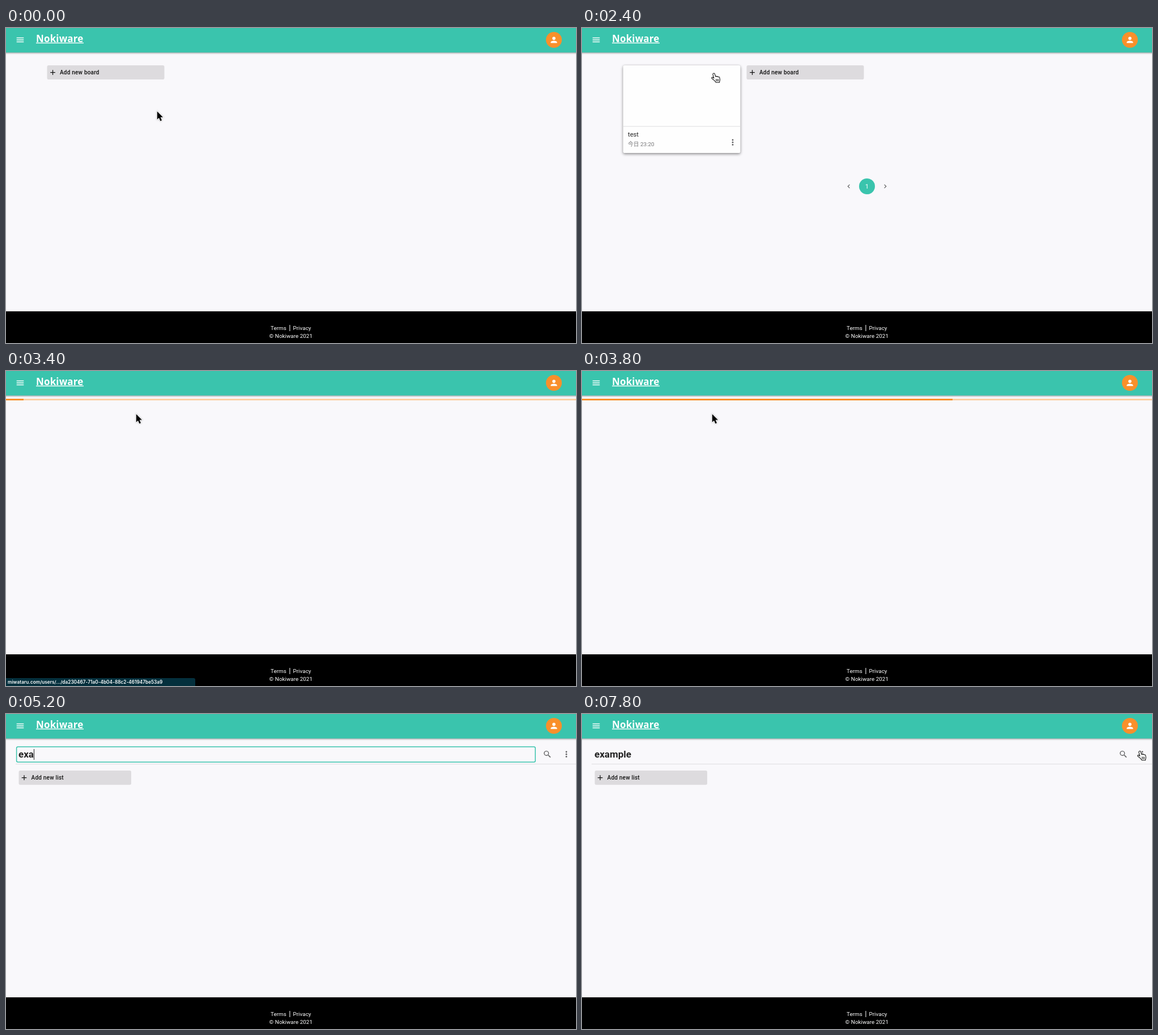
Recreate the animation shown at these times as an HTML page. Size 1006x557 px, loop 8 s.

```html
<!DOCTYPE html>
<html lang="en">
<head>
<meta charset="utf-8">
<title>Board demo</title>
<style>
  html, body { margin: 0; width: 100%; height: 100%; overflow: hidden; background: #f9f8fb; }
  svg { position: absolute; left: 0; top: 0; display: block; }
  text { font-family: Roboto, "Noto Sans CJK JP", "Noto Sans CJK", sans-serif; white-space: pre; fill: #222; }
  .logo { font: 700 17px "Noto Sans", sans-serif; letter-spacing: .15px; fill: #fff; }
  .add { font-size: 10px; font-weight: 500; letter-spacing: .2px; fill: #111; }
  .body { font-size: 11.2px; }
  .hint { font-size: 8.4px; letter-spacing: .27px; fill: #6b6b6d; }
  .date { font-size: 9.8px; fill: #757577; }
  .foot { font-size: 9.8px; letter-spacing: .05px; fill: #fff; }
  .title { font-size: 17px; font-weight: 700; }
  .link { font: 600 8.25px Inter, sans-serif; fill: #fff; }
  .field { fill: none; stroke: #3ac4ad; stroke-width: 1.5; }
  .gray { fill: #dddbde; }
  .rule { fill: #dedde0; }
  .icon { fill: #5f5f61; }
  .dark { fill: #111; }
  .white { fill: #fff; }
  .raised { fill: #fefefe; filter: drop-shadow(0 2px 2.5px rgba(0,0,0,.38)) drop-shadow(0 0 1px rgba(0,0,0,.15)); }
  .caret { fill: #222; }
  #bar { position: absolute; left: 0; top: 48.5px; width: 1006px; height: 3px; overflow: hidden; background: #fbd0a5; }
  #bar i { position: absolute; top: 0; bottom: 0; background: #f9902b; }
</style>
</head>
<body>
<div id="bar"><i></i></div>
<svg width="1006" height="557" viewBox="0 0 1006 557">
  <defs>
    <path id="menu" d="M3 18h18v-2H3zm0-5h18v-2H3zm0-7v2h18V6z"/>
    <path id="person" d="M12 12a4 4 0 1 0 0-8 4 4 0 0 0 0 8zm0 2c-2.7 0-8 1.3-8 4v2h16v-2c0-2.7-5.3-4-8-4z"/>
    <path id="plus" d="M19 13h-6v6h-2v-6H5v-2h6V5h2v6h6z"/>
    <path id="search" fill-rule="evenodd" d="M9.5 3a6.5 6.5 0 0 1 4.94 10.73l.27.27h.79l5 5-1.5 1.5-5-5v-.79l-.27-.27A6.5 6.5 0 1 1 9.5 3zm0 2a4.5 4.5 0 1 0 0 9 4.5 4.5 0 0 0 0-9z"/>
    <path id="prev" d="M15.4 16.6 10.8 12l4.6-4.6L14 6l-6 6 6 6z"/>
    <g id="dots"><circle cx="12" cy="6" r="2"/><circle cx="12" cy="12" r="2"/><circle cx="12" cy="18" r="2"/></g>
  </defs>

  <g id="form">
    <rect class="raised" x="72.5" y="66" width="207" height="54.5" rx="2.8"/>
    <rect class="field" x="79.2" y="72" width="194" height="26.7" rx="2.5"/>
    <text id="name" class="body" x="88" y="90"></text>
    <rect id="nameCaret" class="caret" y="79.5" width="1" height="13.5"/>
    <text class="hint" x="88" y="110.8">2-60 characters</text>
  </g>

  <g id="addBoard">
    <rect class="gray" x="72.5" y="66" width="207" height="25" rx="2.8"/>
    <use href="#plus" class="dark" transform="translate(75.1 71.1) scale(.62)"/>
    <text class="add" x="95" y="82">Add new board</text>
  </g>

  <g id="card">
    <rect class="raised" x="72.5" y="66" width="207" height="155" rx="2.8"/>
    <rect class="rule" x="72.5" y="173.5" width="207" height="1"/>
    <text class="body" x="81" y="192">test</text>
    <text class="date" x="81" y="209">今日 23:20</text>
    <use href="#dots" class="icon" transform="translate(257.6 193.8) scale(.7)"/>
    <use href="#prev" class="icon" transform="translate(463.6 272.8) scale(.6)"/>
    <use href="#prev" class="icon" transform="translate(542.4 272.8) scale(-.6 .6)"/>
    <circle cx="503" cy="280" r="14" fill="#3ac4ad"/>
    <text class="body white" x="503" y="284" text-anchor="middle" style="fill:#fff">1</text>
  </g>

  <g id="board">
    <rect class="rule" x="17" y="88" width="989" height="1"/>
    <rect id="selection" x="22" y="62" width="35" height="19" fill="#b5d6fc"/>
    <text id="title" class="title" x="22" y="77"></text>
    <rect id="titleCaret" class="caret" y="62" width="1" height="19"/>
    <rect id="titleField" class="field" x="18.6" y="58" width="915.6" height="27" rx="2.5"/>
    <use href="#search" class="icon" transform="translate(947.1 62.8) scale(.7)"/>
    <use href="#dots" class="icon" transform="translate(980.6 62.8) scale(.7)"/>
    <rect class="gray" x="22.5" y="100" width="198.5" height="25.3" rx="2.8"/>
    <use href="#plus" class="dark" transform="translate(24.6 105.2) scale(.62)"/>
    <text class="add" x="44.6" y="116.3">Add new list</text>
  </g>

  <rect x="-9" y="-9" width="1024" height="52.3" fill="#3ac4ad" style="filter:drop-shadow(0 1.4px 1.8px rgba(0,0,0,.4))"/>
  <use href="#menu" class="white" transform="translate(16.6 12.6) scale(.7)"/>
  <text class="logo" x="53" y="24.6">Nokiware</text>
  <rect class="white" x="53" y="25.8" width="84" height="1.4"/>
  <circle cx="967" cy="21" r="14" fill="#f9902b"/>
  <use href="#person" class="white" transform="translate(958.6 12.6) scale(.7)"/>

  <rect y="501" width="1006" height="56"/>
  <text class="foot" x="467" y="534">Terms</text>
  <rect class="white" x="500.4" y="525" width="1" height="11"/>
  <text class="foot" x="506.5" y="534">Privacy</text>
  <text class="foot" x="502.8" y="548" text-anchor="middle">© Nokiware 2021</text>

  <g id="status">
    <path d="M0 543h331q3 0 3 3v11H0z" fill="#04303d"/>
    <text class="link" x="3" y="553">miwataru.com/users/.../da230467-71a0-4b04-88c2-461947be53a9</text>
  </g>

  <g id="arrow" style="filter:drop-shadow(0 .8px .8px rgba(0,0,0,.3))">
    <path d="M0 0v14.3l3.2-3 2.4 5.6 2.6-1.1-2.4-5.5h4.4z" stroke="#fff" stroke-width="1.6" paint-order="stroke"/>
  </g>
  <g id="hand" fill="#fff" stroke="#111" stroke-width="1.1" stroke-linejoin="round" stroke-linecap="round">
    <path d="M3.6 1.4C4.6.6 5.9 1.1 6.3 2.3L7.8 7C8.2 6 9.7 6 10.2 7.2c.6-.9 2-.6 2.3.6.8-.7 2.2-.2 2.4 1.2l.5 3c.1 2-.7 3-.8 5.3H8.2c-.2-1.5-1.7-2.1-3-3.9l-4-3.2C.2 9.2 1.3 7.6 2.8 8.3l2 1.5L3 3.3C2.8 2.5 3 1.8 3.6 1.4z"/>
    <path d="M8.6 11.5l.3 3.4M10.6 11.5l.2 3.4M12.6 11.5l.1 3.4" stroke-width=".9"/>
  </g>
  <g id="beam" fill="none" stroke-linecap="round">
    <path id="beamShape" d="M-3-8Q0-8 0-6Q0-8 3-8M0-6V6M-3 8Q0 8 0 6Q0 8 3 8M-1.8 2.2H1.8" stroke="#fff" stroke-width="3"/>
    <use href="#beamShape" style="stroke:#111"/>
    <path d="M-3-8Q0-8 0-6Q0-8 3-8M0-6V6M-3 8Q0 8 0 6Q0 8 3 8M-1.8 2.2H1.8" stroke="#111" stroke-width="1.3"/>
  </g>
</svg>
<script>
const LOOP = 8000, TICK = 200, LOAD_START = 3340;
const $ = id => document.getElementById(id);

// Each table row holds from its time until the next row.
const scenes = [[0, 'start'], [800, 'form'], [2000, 'start'], [2200, 'card'],
                [3400, 'loading'], [4200, 'board']];
const cursors = [
  [0, 'arrow', 266.8, 147.5], [200, 'arrow', 252, 112], [400, 'hand', 231, 83],
  [600, 'hand', 228, 79], [800, 'beam', 232, 83], [1000],
  [2400, 'hand', 228, 79], [3400, 'arrow', 229.8, 76.2],
  [4200, 'beam', 232, 77.5], [4600], [7000, 'beam', 232, 77.5], [7400],
  [7800, 'hand', 979.8, 64.5]
];
const names = [[0, ''], [1000, 't'], [1200, 'te'], [1400, 'test']];
const titles = [[0, 'test'], [4600, 'e'], [5000, 'ex'], [5200, 'exa'], [5600, 'exam'],
                [5800, 'examp'], [6000, 'exampl'], [6200, 'example']];
const fades = [[0, 0], [2600, .5], [2800, 1], [3600, 0]];

const at = (table, t) => table.findLast(row => row[0] <= t);
const show = (el, on) => { el.style.display = on ? '' : 'none'; };
const within = (t, from, to) => t >= from && t < to;

function type(id, value, caretOn) {
  const text = $(id), caret = $(id + 'Caret');
  if (text.textContent !== value) text.textContent = value;
  const width = value ? text.getComputedTextLength() : 0;
  caret.setAttribute('x', +text.getAttribute('x') + width);
  show(caret, caretOn);
}

const loader = document.querySelector('#bar i').animate(
  [{ left: '-200%', right: '100%' }, { left: '107%', right: '-8%' }],
  { duration: 1320, easing: 'ease', fill: 'both' });
loader.pause();

function draw(t) {
  const scene = at(scenes, t)[1];
  show($('form'), scene === 'form');
  show($('addBoard'), scene === 'start' || scene === 'card');
  $('addBoard').setAttribute('transform', `translate(${scene === 'card' ? 218 : 0} 0)`);
  show($('card'), scene === 'card');
  show($('board'), scene === 'board');
  show($('bar'), scene === 'loading');
  loader.currentTime = Math.max(0, Math.min(1320, t - LOAD_START));

  if (scene === 'form') type('name', at(names, t)[1], true);
  if (scene === 'board') {
    type('title', at(titles, t)[1], within(t, 4600, 6600));
    show($('titleField'), within(t, 4400, 7400));
    show($('selection'), within(t, 4400, 4600));
  }
  $('status').style.opacity = at(fades, t)[1];

  const [, kind, x, y] = at(cursors, t);
  for (const id of ['arrow', 'hand', 'beam']) {
    show($(id), id === kind);
    if (id === kind) $(id).setAttribute('transform', `translate(${x} ${y})`);
  }
}

const start = performance.now();
function frame() {
  const t = (performance.now() - start) % LOOP;
  draw(Math.floor(t / TICK) * TICK);
  requestAnimationFrame(frame);
}
frame();
</script>
</body>
</html>
```
